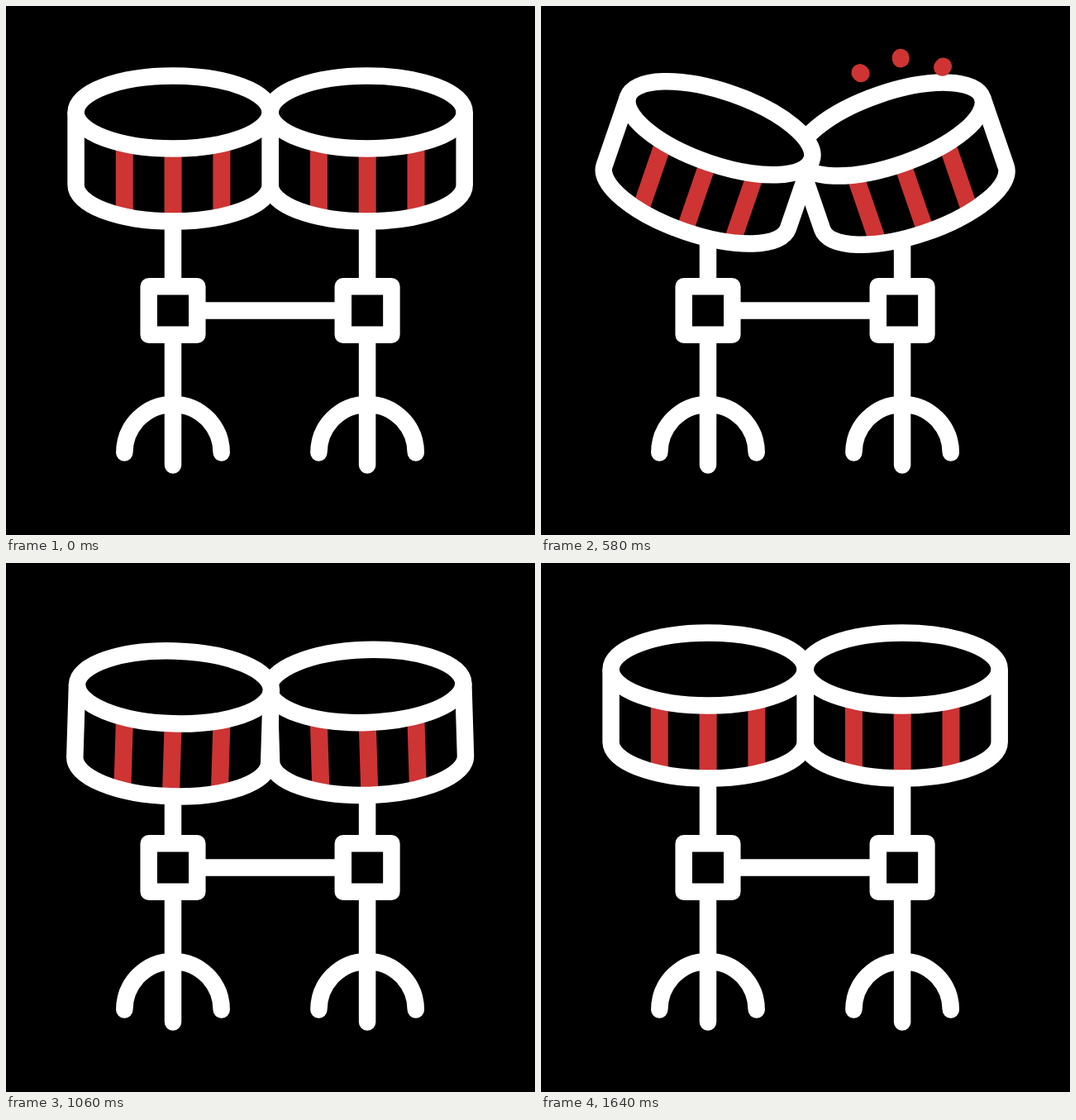
Write an HTML page that moves like this. It is 640x640 px and loops after 1800 ms.

```html
<!DOCTYPE html>
<html lang="en">
<head>
<meta charset="utf-8">
<title>Twin drums</title>
<style>
  html, body { margin: 0; width: 100%; height: 100%; overflow: hidden; background: #000; }
  svg { display: block; width: 100%; height: 100%; }
  .line { fill: none; stroke: #fff; stroke-width: 20.5; stroke-linejoin: round; }
  .round { stroke-linecap: round; }
  .red { fill: none; stroke: #cd3433; stroke-width: 21; }
</style>
</head>
<body>
<svg viewBox="0 0 640 640">
  <defs>
    <g id="stand">
      <path class="line" d="M0 258V339"/>
      <rect class="line" x="-29.3" y="339.2" width="58.6" height="58.6"/>
      <path class="line round" d="M0 400V555.4M-58.7 540.6A58.7 58.7 0 0 1 58.7 540.6"/>
    </g>
    <g id="drum">
      <path d="M-117.5 -44A117.5 44 0 0 1 117.5 -44V44A117.5 44 0 0 1 -117.5 44Z"/>
      <path class="red" d="M-58.8 -6V82M0 0V88M58.8 -6V82"/>
      <path class="line" d="M-117.5 -44V44A117.5 44 0 0 0 117.5 44V-44"/>
      <ellipse class="line" cy="-44" rx="117.5" ry="44"/>
    </g>
  </defs>
  <path class="line" d="M231 368.5H408"/>
  <use href="#stand" x="202"/>
  <use href="#stand" x="437.1"/>
  <use id="rightDrum" href="#drum"/>
  <use id="leftDrum" href="#drum"/>
  <path id="leftMarks" class="red round" transform="translate(192.6 82) rotate(-2)"/>
  <path id="rightMarks" class="red round" transform="translate(437.4 92.2) rotate(-4.3)"/>
</svg>
<script>
  const LOOP = 1800;
  const HITS = [250, 735, 1204];
  const $ = id => document.getElementById(id);
  const clamp = v => Math.max(0, Math.min(1, v));
  const smooth = v => (1 - Math.cos(Math.PI * clamp(v))) / 2;

  // Each hit pushes the drum down, holds it briefly and lets it rise.
  const drop = t => HITS.reduce((y, hit) => y + 54 * smooth((222 - Math.abs(t - hit)) / 180), 0);

  // A fading swing: each turning point eases into the next.
  function tilt(t, first) {
    const times = [0, first, 550, 835, 1200, 1470];
    const angles = [0, -19, 20, -16, 10, 0];
    return angles.slice(1).reduce((a, next, i) =>
      a + (next - angles[i]) * smooth((t - times[i]) / (times[i + 1] - times[i])), 0);
  }

  // Three dashes fanned 45 degrees apart, trimmed from both ends.
  function fan(t) {
    const head = 30 * clamp((t - 92) / 160);
    const tail = 30 * clamp((t - 250) / 160);
    if (head <= 0 || tail >= 30) return '';
    return [-1, 0, 1].map(side => {
      const a = side * Math.PI / 4;
      const at = r => `${29.3 * side + r * Math.sin(a)} ${5.8 * Math.abs(side) - r * Math.cos(a)}`;
      return `M${at(tail)}L${at(head)}`;
    }).join('');
  }

  function drawDrum(name, x, t, delay, angle) {
    const y = 172.5 + drop(t - delay);
    $(name + 'Drum').setAttribute('transform', `translate(${x} ${y}) rotate(${angle})`);
    $(name + 'Marks').setAttribute('d', fan(t - delay));
  }

  function draw(t) {
    drawDrum('left', 202.1, t, 0, tilt(t, 230));
    drawDrum('right', 437.2, t, 180, -tilt(t, 290));
  }

  const start = performance.now();
  function tick() {
    draw((performance.now() - start) % LOOP);
    requestAnimationFrame(tick);
  }
  draw(0);
  requestAnimationFrame(tick);
</script>
</body>
</html>
```
